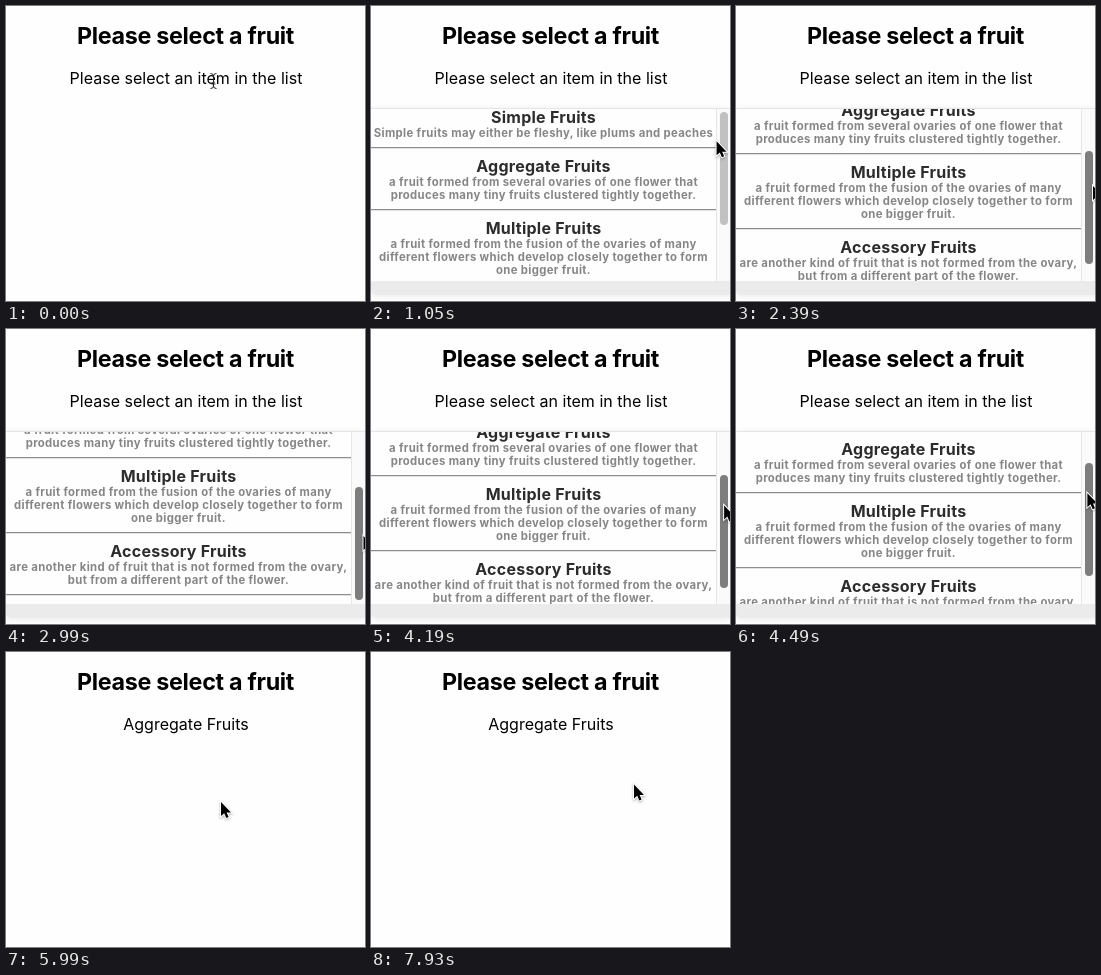
These frames come from a looping animation (359 by 295 pixels, 8000 ms). An HTML page:

```html
<!DOCTYPE html>
<html lang="en">
<head>
<meta charset="utf-8">
<title>Fruit picker</title>
<style>
  html, body { margin: 0; width: 100%; height: 100%; overflow: hidden; background: #fefefe; }
  body {
    position: relative; color: #000; text-align: center; white-space: nowrap;
    font-family: Inter, "Open Sans", sans-serif; font-optical-sizing: none;
  }
  #heading, #status, #popup, #popup > *, #pointer { position: absolute; }
  #heading { left: 0; width: 359px; top: 14px; font: 700 23.3px/31px Inter, sans-serif; letter-spacing: -.3px; }
  #status { left: 0; width: 360px; top: 62px; font-size: 16px; line-height: 21px; letter-spacing: .02px; }
  #popup {
    left: 0; top: 102px; width: 359px; height: 187px; background: #fefefe;
    border-radius: 0 0 0 5px; box-shadow: 0 1px 6px rgba(0, 0, 0, .09);
  }
  #list { left: 0; top: 0; width: 345px; height: 173px; overflow: hidden; border-top: 1px solid #e6e6e6; box-sizing: border-box; }
  #track { left: 345px; top: 0; width: 14px; height: 173px; box-sizing: border-box; background: #fafafa; border: solid #e6e6e6; border-width: 1px 0 0 1px; }
  #thumb { left: 349px; top: 4px; width: 8px; height: 113px; border-radius: 4px; }
  #footer { left: 0; top: 173px; width: 359px; height: 14px; background: #ebebeb; border-radius: 0 0 0 5px; }
  #rows { margin-top: -1px; }
  .name { font-weight: 700; font-size: 16px; line-height: 19px; letter-spacing: .25px; color: #2c2c2c; }
  .about { font-weight: 700; font-size: 11.3px; line-height: 13px; letter-spacing: .35px; color: #868686; }
  hr { height: 0; margin: 7px 0 8px; border: solid; border-width: 1px 0; border-color: #8e8e8e transparent #e2e2e2; }
  #pointer { left: 0; top: 0; width: 359px; height: 295px; }
  #arrow { filter: drop-shadow(0 1px 1px rgba(0, 0, 0, .3)); }
</style>
</head>
<body>
<div id="heading">Please select a fruit</div>
<div id="status"></div>
<div id="popup">
  <div id="list"><div id="rows"></div></div>
  <div id="track"></div>
  <div id="thumb"></div>
  <div id="footer"></div>
</div>
<svg id="pointer" viewBox="0 0 359 295">
  <path id="arrow" d="M0 0V14L3.2 11.2 5.3 16 7.6 15 5.6 10.4H10Z" stroke="#fff" stroke-width="2" paint-order="stroke"/>
  <path id="beam" d="M-3 -7.5Q0 -7.5 0 -5V5Q0 7.5 -3 7.5M3 -7.5Q0 -7.5 0 -5M0 5Q0 7.5 3 7.5M-2 3H2" fill="none" stroke="#222"/>
</svg>
<script>
const $ = id => document.getElementById(id);
const clamp = (v, low, high) => Math.min(high, Math.max(low, v));

// All times below are in ticks: the screen refreshes once per tick.
const LOOP = 8000, TICK = 150, LEAD = 20;
const OPEN = 1, RELEASE = 31, CLOSE = 37;
const GRAB_Y = 138.3, DRAG_LAG = 1 / 3, SCROLL_RATIO = 1.43, MAX_SCROLL = 75;

const fruits = [
  ["Simple Fruits", "Simple fruits may either be fleshy, like plums and peaches"],
  ["Aggregate Fruits", "a fruit formed from several ovaries of one flower that", "produces many tiny fruits clustered tightly together."],
  ["Multiple Fruits", "a fruit formed from the fusion of the ovaries of many", "different flowers which develop closely together to form", "one bigger fruit."],
  ["Accessory Fruits", "are another kind of fruit that is not formed from the ovary,", "but from a different part of the flower."]
];
$("rows").innerHTML = fruits.map(([name, ...lines]) =>
  `<div class="name">${name}</div><div class="about">${lines.join("<br>")}</div><hr>`).join("");

const home = { x: 207.5, y: 75 };
const moves = [
  { from: 1, to: 7.3, x: 352.5, y: GRAB_Y },  // to the scrollbar
  { from: 10.8, to: 16, x: 357, y: 180 },     // drag down
  { from: 16, to: 20, x: 357.5, y: 207 },     // past the end
  { from: 23, to: RELEASE, x: 350.5, y: 158 },// drag back up
  { from: RELEASE, to: 35, x: 215, y: 150 },  // to the chosen row
  { from: 40, to: 44, x: 200, y: 132 },
  { from: 47, to: 53, x: 263, y: 132.5 }
];

function pointerAt(time) {
  return moves.reduce((p, move) => {
    const k = clamp((time - move.from) / (move.to - move.from), 0, 1);
    return { x: p.x + (move.x - p.x) * k, y: p.y + (move.y - p.y) * k };
  }, home);
}

// The list follows the dragged pointer a little late, until it is let go.
function scrollAt(time) {
  const { y } = pointerAt(Math.min(time - DRAG_LAG, RELEASE));
  return clamp((y - GRAB_Y) * SCROLL_RATIO, 0, MAX_SCROLL);
}

function draw(now) {
  const time = Math.floor((now % LOOP + LEAD) / TICK);
  const { x, y } = pointerAt(time), scroll = scrollAt(time);
  const overText = y < 82;
  $("status").textContent = time < CLOSE ? "Please select an item in the list" : "Aggregate Fruits";
  $("popup").style.visibility = time >= OPEN && time < CLOSE ? "visible" : "hidden";
  $("rows").style.transform = `translateY(${-Math.round(scroll)}px)`;
  $("thumb").style.transform = `translateY(${Math.round(scroll / SCROLL_RATIO)}px)`;
  $("thumb").style.background = x > 346 ? "#7d7d7d" : "#c1c1c1";
  $("arrow").style.display = overText ? "none" : "";
  $("beam").style.display = overText ? "" : "none";
  for (const id of ["arrow", "beam"]) $(id).setAttribute("transform", `translate(${x} ${y})`);
  requestAnimationFrame(draw);
}
draw(0);
</script>
</body>
</html>
```
